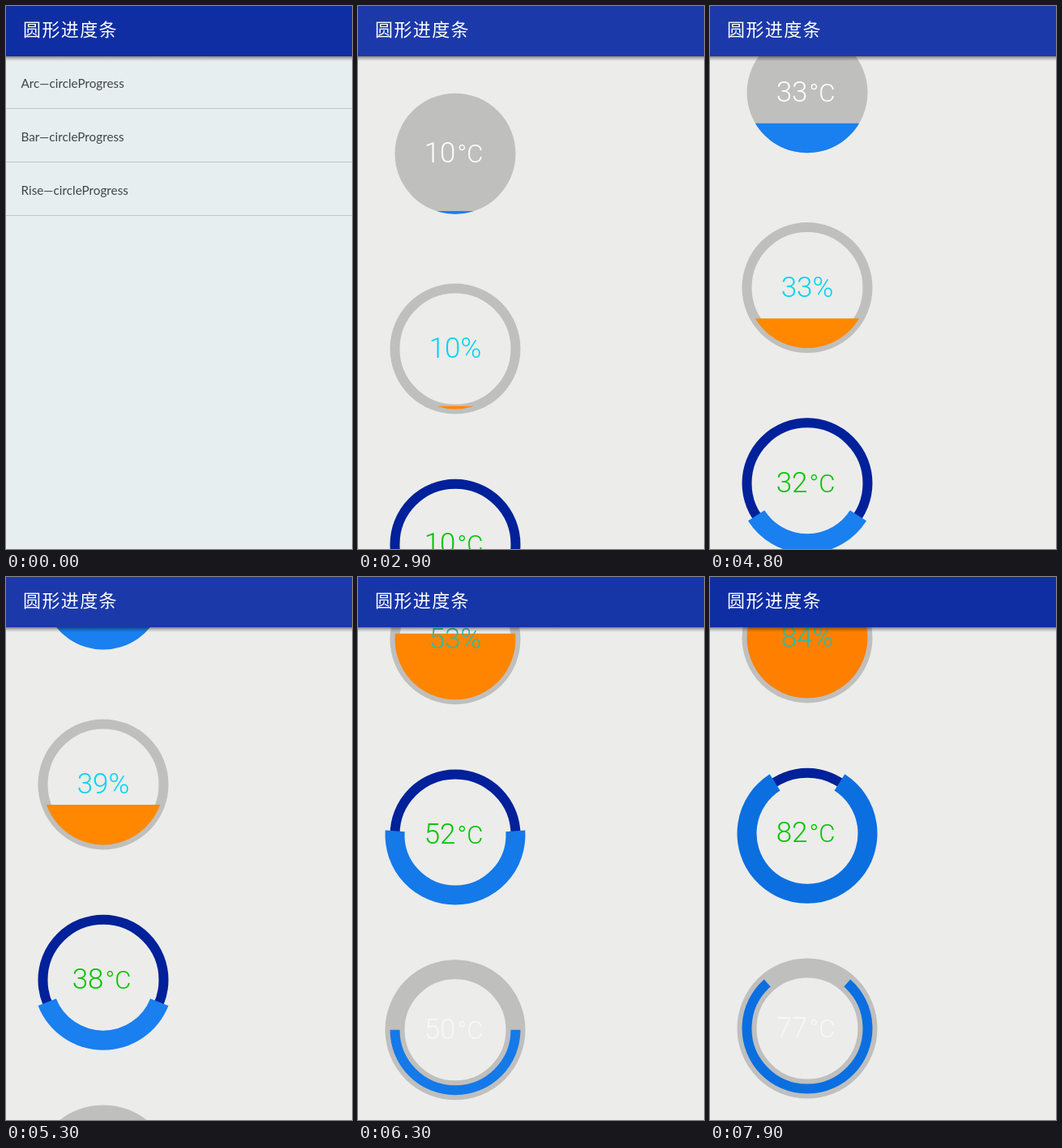
These frames come from a looping animation (427 px wide and 670 px high, 8 s). An HTML page:

```html
<!DOCTYPE html>
<html lang="zh">
<head>
<meta charset="utf-8">
<style>
html, body { margin: 0; width: 100%; height: 100%; overflow: hidden; background: #ececea; }
svg { display: block; width: 427px; height: 670px; }
.title { font: 300 22px "Noto Sans CJK SC", "Noto Sans CJK", sans-serif; letter-spacing: 1.4px; fill: #fff; }
.row { font: 15.3px Lato, sans-serif; fill: #424546; }
.line { stroke: #c3c7c7; }
.num { font: 300 35px Roboto, sans-serif; text-anchor: middle; }
.deg { font-size: 31px; }
.ring { fill: none; stroke-width: 12; }
.wide { stroke-width: 24; }
</style>
</head>
<body>
<svg viewBox="0 0 427 670">
  <defs>
    <linearGradient id="shade" x2="0" y2="1">
      <stop offset="0" stop-color="#000" stop-opacity=".45"/>
      <stop offset=".45" stop-color="#000" stop-opacity=".2"/>
      <stop offset="1" stop-color="#000" stop-opacity="0"/>
    </linearGradient>
    <text id="title" class="title" x="21" y="37">圆形进度条</text>
  </defs>
  <rect id="back" width="427" height="670"/>
  <g id="list"></g>
  <g id="page"><g id="scroll"></g></g>
  <rect id="bar" width="427" height="62"/>
  <rect y="62" width="427" height="6" fill="url(#shade)"/>
  <use id="title1" href="#title"/>
  <use id="title2" href="#title"/>
</svg>
<script>
const LOOP = 8000, W = 427, CX = 120, R = 74.5;
const $ = id => document.getElementById(id);

function add(parent, tag, attrs, text = '') {
  const el = document.createElementNS('http://www.w3.org/2000/svg', tag);
  put(el, attrs);
  el.textContent = text;
  return parent.appendChild(el);
}
function put(el, attrs) {
  for (const name in attrs) el.setAttribute(name, attrs[name]);
}

const fade = (from, to, t) => Math.min(1, Math.max(0, (t - from) / (to - from)));
const blend = (a, b, k) => `rgb(${a.map((v, i) => Math.round(v + (b[i] - v) * k))})`;

['Arc', 'Bar', 'Rise'].forEach((name, i) => {
  const y = Math.floor(126.8 + 65.6 * i) + 0.5;
  add($('list'), 'text', { class: 'row', x: 18.5, y: y - 26 }, name + '—circleProgress');
  add($('list'), 'path', { class: 'line', d: `M0 ${y}H${W}` });
});

// Each gauge has a track, a level shape, a text and a rule for its value.
const gauges = [
  { cy: 182.2, disc: true, track: '#bfbfbe', ink: '#fff', value: p => p },
  { cy: 423, disc: true, ring: true, track: '#bfbfbe', unit: '%', value: p => p },
  { cy: 664.3, ring: true, track: '#00219a', ink: '#00c400', level: 'ring wide', value: p => 0.98 * p },
  { cy: 905, ring: true, wide: true, track: '#bfbfbe', ink: '#f7f7f7', level: 'ring', value: p => 0.875 * p + 3.6 }
];
for (const g of gauges) {
  const root = $('scroll');
  const look = g.ring
    ? { class: g.wide ? 'ring wide' : 'ring', stroke: g.track }
    : { fill: g.track };
  add(root, 'circle', { cx: CX, cy: g.cy, r: R, ...look });
  g.shape = add(root, 'path', { class: g.level || '' });
  g.text = add(root, 'text', { class: 'num', x: g.unit ? CX : CX - 2, y: g.cy + 11, fill: g.ink });
  g.digits = add(g.text, 'tspan', {});
  if (g.unit) add(g.text, 'tspan', {}, g.unit);
  else add(g.text, 'tspan', { class: 'deg', dx: 2 }, '°C');
}

// Arc centred on the bottom of a circle, growing up both sides.
function arc(cy, percent) {
  const a = percent * Math.PI / 100;
  const dx = R * Math.sin(a), y = cy + R * Math.cos(a);
  return `M${CX - dx} ${y}A${R} ${R} 0 ${percent > 50 ? 1 : 0} 0 ${CX + dx} ${y}`;
}

function progress(s) {
  return 1 + 12.1 * Math.max(0, s - 2.13) + 2 * Math.max(0, s - 5.3) ** 2;
}

function scrolled(s) {
  const x = Math.max(0, s - 4.395);
  return Math.min(348, 187 * x - 2.8 * x * x);
}

function draw(s) {
  const slide = Math.round(W * (1 - Math.cos(Math.PI * fade(1.613, 2.05, s))) / 2);
  const p = progress(s);
  const enter = fade(1.2, 1.7, s), late = fade(5.3, 7.9, s);
  const blue = blend([26, 127, 239], [11, 111, 224], late);
  const orange = blend([255, 136, 0], [255, 128, 0], late);

  put($('back'), { fill: blend([230, 238, 239], [236, 236, 234], enter) });
  put($('bar'), { fill: blend([15, 46, 163], [27, 57, 169], enter - late) });
  for (const id of ['list', 'title1']) put($(id), { transform: `translate(${-slide})` });
  for (const id of ['page', 'title2']) put($(id), { transform: `translate(${W - slide})` });
  put($('scroll'), { transform: `translate(0 ${-scrolled(s)})` });

  for (const g of gauges) {
    const n = Math.max(1, Math.floor(g.value(p)));
    const color = g.unit ? orange : blue;
    put(g.shape, g.disc
      ? { d: arc(g.cy, n) + 'Z', fill: color }
      : { d: arc(g.cy, n), stroke: color });
    g.digits.textContent = n;
    if (g.unit) put(g.text, { fill: blend([0, 212, 240], [40, 190, 165], fade(44, 53, n)) });
  }
}

const start = performance.now();
function tick() {
  draw((performance.now() - start) % LOOP / 1000);
  requestAnimationFrame(tick);
}
tick();
</script>
</body>
</html>
```
